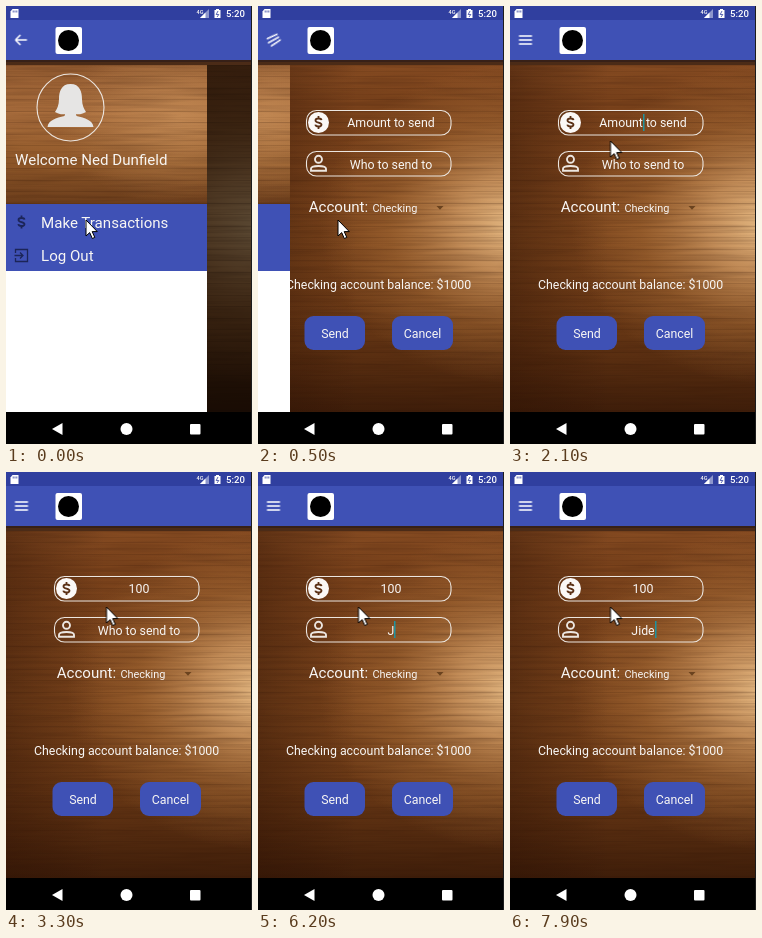
Recreate the animation shown at these times as an HTML page. Size 246 px wide and 438 px high, loop 8000 ms.

```html
<!DOCTYPE html>
<html lang="en">
<head>
<meta charset="utf-8">
<title>Send money</title>
<style>
  html, body { margin: 0; width: 100%; height: 100%; overflow: hidden; background: #000; }
  svg { display: block; width: 100vw; height: 100vh; }
  text { font: 12.35px Roboto, Arial, sans-serif; fill: #f8f6f4; }
  .large { font-size: 15.1px; }
  .small { font-size: 10.9px; }
  .mid { text-anchor: middle; }
  .clock { font-size: 9.6px; font-weight: 500; fill: #fff; }
  .outline { fill: none; stroke: #ece6e0; stroke-width: 1.1; }
  .navy { fill: none; stroke: #1c2558; stroke-width: 1.3; }

  .drawer, .scrim, .menu, .bars { animation: 8s cubic-bezier(.3, .5, .6, .9) infinite; }
  .drawer { animation-name: slide; }
  .scrim { animation-name: fade; }
  .menu { animation-name: turn; }
  .bars { animation-name: unfold; fill: none; stroke: #fff; stroke-width: 1.5; }
  .form { animation: appear 8s step-end infinite; }
  .pointer { animation: point 8s ease-in-out infinite; }

  @keyframes slide {
    0%, 3.75% { transform: translateX(0); }
    7.5%, 100% { transform: translateX(-201px); }
  }
  @keyframes fade {
    0%, 3.75% { opacity: .6; }
    6.25%, 100% { opacity: 0; }
  }
  @keyframes turn {
    0%, 3.75% { transform: rotate(-180deg); }
    7.5%, 100% { transform: rotate(0deg); }
  }
  @keyframes unfold {
    0%, 3.75% { d: path("M1 -5L6 0M-5.5 0L5.5 0M1 5L6 0"); }
    7.5%, 100% { d: path("M-6.5 -4L6.5 -4M-6.5 0L6.5 0M-6.5 4L6.5 4"); }
  }
  @keyframes appear {
    0% { visibility: hidden; }
    4.5%, 100% { visibility: visible; }
  }
  @keyframes point {
    0%, 7.5% { transform: translate(80px, 214px); }
    13.75% { transform: translate(98px, 141px); }
    15%, 100% { transform: translate(100.5px, 135px); }
  }
</style>
</head>
<body>
<svg viewBox="0 0 246 438" preserveAspectRatio="none">
  <defs>
    <linearGradient id="wood" x2="0" y2="1">
      <stop offset="0" stop-color="#874c22"/>
      <stop offset=".12" stop-color="#7a421b"/>
      <stop offset=".5" stop-color="#7c451c"/>
      <stop offset=".75" stop-color="#693815"/>
      <stop offset="1" stop-color="#3e1d09"/>
    </linearGradient>
    <radialGradient id="glow" gradientUnits="userSpaceOnUse" cx="0" cy="0" r="1"
      gradientTransform="translate(256 218) scale(195 160)">
      <stop offset="0" stop-color="#e9bd86"/>
      <stop offset=".3" stop-color="#d6a068" stop-opacity=".78"/>
      <stop offset=".65" stop-color="#b67a40" stop-opacity=".38"/>
      <stop offset="1" stop-color="#b67a40" stop-opacity="0"/>
    </radialGradient>
    <linearGradient id="shade">
      <stop offset="0" stop-color="#2a0f02" stop-opacity=".4"/>
      <stop offset=".4" stop-color="#2a0f02" stop-opacity="0"/>
    </linearGradient>
    <linearGradient id="header" x2="0" y2="1">
      <stop offset="0" stop-color="#935b30"/>
      <stop offset=".35" stop-color="#a96d3c"/>
      <stop offset=".7" stop-color="#905829"/>
      <stop offset="1" stop-color="#6b3d1b"/>
    </linearGradient>
    <radialGradient id="headerGlow" cx=".85" cy=".4" r=".6">
      <stop offset="0" stop-color="#d29a62" stop-opacity=".6"/>
      <stop offset="1" stop-color="#d29a62" stop-opacity="0"/>
    </radialGradient>
    <pattern id="planks" width="246" height="23" y="59" patternUnits="userSpaceOnUse">
      <path d="M0 .5H246M0 11.5H246" stroke="#3a1806" stroke-opacity=".16"/>
      <path d="M0 6.5H246M0 17.5H246" stroke="#3a1806" stroke-opacity=".06"/>
    </pattern>
    <filter id="grain" x="0" y="0" width="1" height="1" color-interpolation-filters="sRGB">
      <feTurbulence type="fractalNoise" baseFrequency=".012 .3" numOctaves="2" seed="4"/>
      <feColorMatrix values="0 0 0 0 .18  0 0 0 0 .07  0 0 0 0 .02  .35 0 0 0 -.13"/>
    </filter>
    <path id="dollar" fill="none" stroke-width="1.8" d="M3-2.4C2.6-4.6-3-4.6-3-2.1S3 0 3 2.3-2.8 4.6-3.2 2.2M0-6.500V-4M0 4V6.500"/>
  </defs>

  <!-- form -->
  <rect y="54" width="246" height="352" fill="url(#wood)"/>
  <rect y="54" width="246" height="352" fill="url(#glow)"/>
  <rect y="54" width="246" height="352" fill="url(#shade)"/>
  <rect y="54" width="246" height="352" fill="url(#planks)"/>
  <rect y="54" width="246" height="352" filter="url(#grain)"/>

  <g class="form">
    <g class="outline">
      <rect x="48.5" y="104.5" width="144.5" height="24.5" rx="10"/>
      <rect x="48.5" y="145.5" width="144.5" height="24.5" rx="10"/>
    </g>
    <circle cx="60.5" cy="116.5" r="10.5" fill="#fbf8f6"/>
    <use href="#dollar" x="60.5" y="116.5" stroke="#5a2f14"/>
    <g class="outline" style="stroke-width:1.9">
      <circle cx="60.5" cy="153.3" r="3.5"/>
      <path d="M53 164.800V162.800C53 159 68 159 68 162.800V164.800Z"/>
    </g>
    <text id="amount" class="mid" x="133" y="121"></text>
    <text id="who" class="mid" x="133" y="162.500"></text>
    <rect id="caret" width="1.500" height="17" fill="#1f93a0"/>

    <text class="large" x="50.700" y="206">Account:</text>
    <text class="small" x="114.500" y="206">Checking</text>
    <path d="M178.500 200H185.500L182 203.800Z" fill="#6b431f"/>
    <text x="28" y="282.800">Checking account balance: $1000</text>
    <g fill="#3f51b5">
      <rect x="46.500" y="310" width="60.500" height="34" rx="9"/>
      <rect x="134" y="310" width="61" height="34" rx="9"/>
    </g>
    <text class="mid" x="77" y="332">Send</text>
    <text class="mid" x="164.500" y="332">Cancel</text>
  </g>

  <rect class="scrim" y="54" width="246" height="352"/>

  <!-- drawer -->
  <g class="drawer">
    <rect y="59" width="201" height="347" fill="#fff"/>
    <rect y="59" width="201" height="139" fill="url(#header)"/>
    <rect y="59" width="201" height="139" fill="url(#headerGlow)"/>
    <rect y="59" width="201" height="139" fill="url(#planks)"/>
    <rect y="59" width="201" height="139" filter="url(#grain)"/>
    <circle class="outline" cx="64.500" cy="101.500" r="33.500"/>
    <path fill="#e6e5e4" d="M64.500 78C55 78 53 86 53 93 53 99 51 103 49 106 53 108.500 57 108.500 59 108L58.500 110C50 112 42.500 114 41.500 121H87.500C86.500 114 79 112 70.500 110L70 108C72 108.500 76 108.500 80 106 78 103 76 99 76 93 76 86 74 78 64.500 78Z"/>
    <text class="large" x="9" y="158.500">Welcome Ned Dunfield</text>
    <rect y="198" width="201" height="67" fill="#3f51b5"/>
    <use href="#dollar" x="15.500" y="216" stroke="#1c2558"/>
    <path class="navy" d="M9.500 247V243.500H21.500V255.500H9.500V252M8.500 249.500H17M14 246.500L17 249.500 14 252.500"/>
    <text class="large" x="35" y="221.500">Make Transactions</text>
    <text class="large" x="35" y="254.500">Log Out</text>
  </g>

  <!-- bars -->
  <rect y="54" width="246" height="5" fill="#4b2b17"/>
  <rect y="54" width="246" height="2" fill="#2a1a18" opacity=".6"/>
  <rect width="246" height="54" fill="#3f51b5"/>
  <rect width="246" height="14" fill="#303f9f"/>
  <path d="M6.500 3H12.500V12H4.500V5.500Z" fill="#fff"/>
  <path d="M7.200 4.500V6.500M9 4.500V6.500M10.800 4.500V6.500" stroke="#303f9f" stroke-width=".8"/>
  <text x="190.500" y="7.500" style="font-size:5.500px;font-weight:500">4G</text>
  <path d="M203 3V12H194Z" fill="#8d96cc"/>
  <path d="M199.500 6.500V12H194Z" fill="#fff"/>
  <path d="M208.500 4H210V3H213V4H214.500V12H208.500Z" fill="#fff"/>
  <path d="M212 5L210.200 8.500H212.800L211 11" fill="none" stroke="#303f9f" stroke-width=".8"/>
  <text class="clock" x="220" y="10.500">5:20</text>
  <g transform="translate(15.500 34)">
    <g class="menu"><path class="bars" d="M-6.5 -4L6.5 -4M-6.5 0L6.5 0M-6.5 4L6.5 4"/></g>
  </g>
  <rect x="49.500" y="21" width="26.500" height="27" rx="2" fill="#fff"/>
  <circle cx="62.500" cy="34.500" r="10.500" fill="#000"/>

  <rect y="406" width="246" height="32" fill="#000"/>
  <g fill="#fff">
    <path d="M46 423L56.500 417V429Z"/>
    <circle cx="120.500" cy="423" r="6"/>
    <rect x="184" y="418" width="10.500" height="10.500" rx="1"/>
  </g>
  <rect x="245" width="1" height="438" fill="#1c1c1c"/>

  <g class="pointer">
    <path d="M0 0V16L3.700 12.600 6.300 18.500 8.800 17.400 6.200 11.600H11.300Z" fill="#fff" stroke="#000" stroke-width="1"/>
  </g>
</svg>
<script>
  const LOOP = 8000, BLINK = 500, CENTER = 133;
  const fields = {
    amount: { hint: 'Amount to send', top: 108 },
    who: { hint: 'Who to send to', top: 149 }
  };
  // time, focused field, its value
  const edits = [
    [1000, 'amount', ''], [2200, 'amount', '1'], [2500, 'amount', '10'], [2700, 'amount', '100'],
    [4900, 'who', ''], [6100, 'who', 'J'], [6600, 'who', 'Ji'], [7000, 'who', 'Jid'], [7500, 'who', 'Jide']
  ];
  const byId = id => document.getElementById(id);
  const caret = byId('caret');

  function setText(node, value) {
    if (node.textContent !== value) node.textContent = value;
  }

  function draw() {
    const t = performance.now() % LOOP;
    const done = edits.filter(([at]) => at <= t);
    const values = {};
    for (const [, name, value] of done) values[name] = value;
    for (const name in fields) setText(byId(name), values[name] || fields[name].hint);

    const last = done[done.length - 1];
    const lit = last && (t - last[0]) % (2 * BLINK) < BLINK;
    caret.style.visibility = lit ? 'visible' : 'hidden';
    if (lit) {
      const [, name, value] = last;
      const offset = value ? byId(name).getComputedTextLength() / 2 : 0;
      caret.setAttribute('x', Math.round(CENTER + offset));
      caret.setAttribute('y', fields[name].top);
    }
    requestAnimationFrame(draw);
  }
  draw();
</script>
</body>
</html>
```
